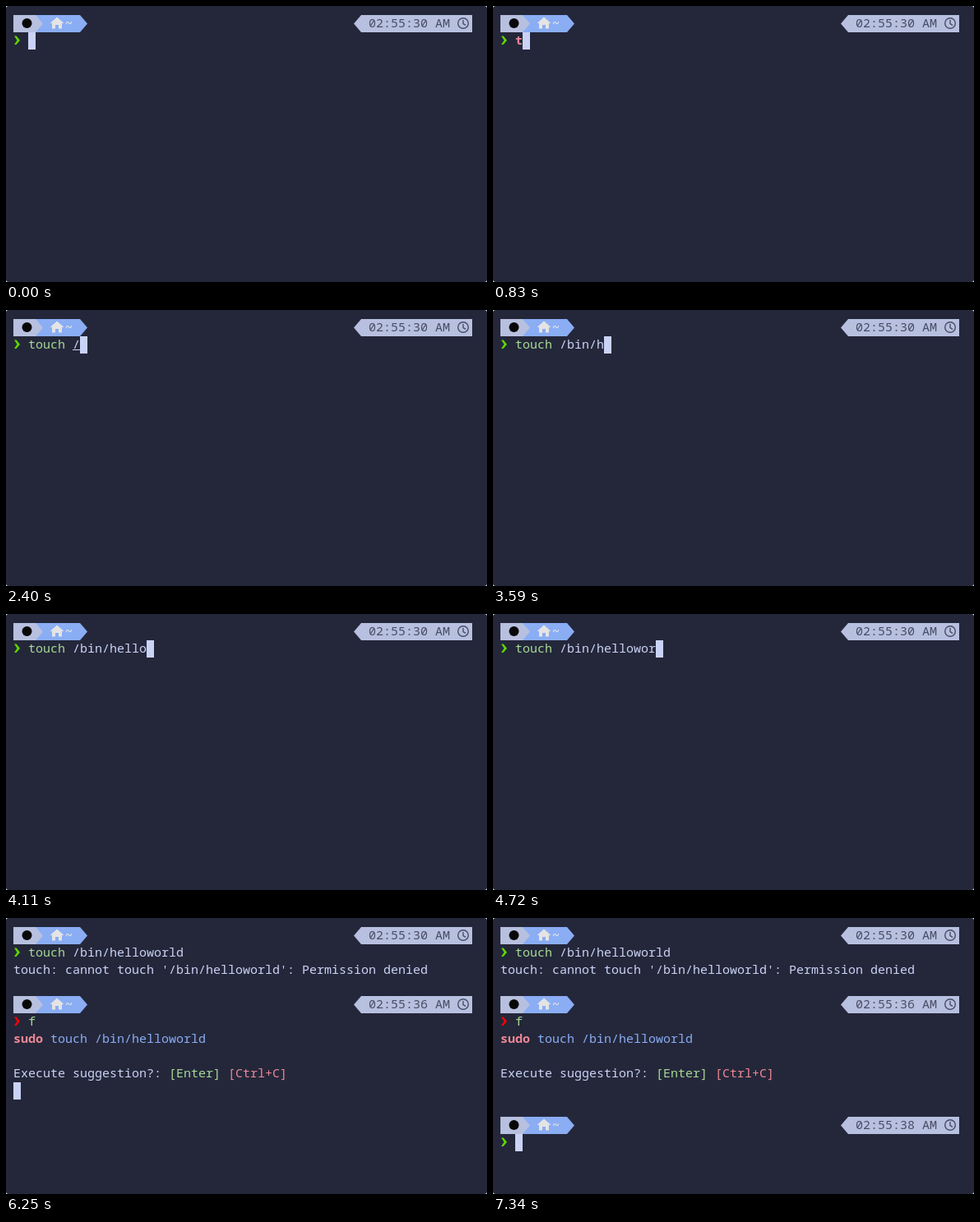
Write an HTML page that moves like this. It is 585 by 336 pixels and loops after 8000 ms.

```html
<!DOCTYPE html>
<html lang="en">
<head>
<meta charset="utf-8">
<title>Terminal</title>
<style>
  html, body { margin: 0; width: 100%; height: 100%; overflow: hidden; background: #fff; }
  svg { display: block; width: 585px; height: 336px; }
  text { font: 15px "Noto Sans Mono", "DejaVu Sans Mono", monospace; white-space: pre; }
  .bold { font-weight: 700; }
</style>
</head>
<body>
<svg id="stage" viewBox="0 0 585 336"></svg>
<script>
const LOOP = 8000, CELL = 9, LINE = 21, LEFT = 9, TOP = 11;
const color = {
  back: '#24273a', text: '#cad3f5', pale: '#b8c0e0', blue: '#8aadf4', green: '#a6da95',
  red: '#ed8796', white: '#e4e4e4', dim: '#494d64', ok: '#5fd700', fail: '#ff0000'
};

const command = 'touch /bin/helloworld';
const keyTimes = [830, 920, 1010, 1100, 1260, 1820, 2400, 2710, 2830, 2960, 3230,
  3590, 3660, 3850, 4000, 4110, 4490, 4610, 4720, 4820, 4950];
const DENIED = 5110, ALIAS = 6070, SUGGEST = 6250, DONE = 7340;

const x = col => LEFT + col * CELL;
const y = row => TOP + row * LINE;

function text(col, row, string, fill = color.text, bold = false) {
  return `<text x="${x(col)}" y="${y(row) + 15}" fill="${fill}"${bold ? ' class="bold"' : ''}>${string}</text>`;
}

function cursor(col, row) {
  return `<rect x="${x(col)}" y="${y(row)}" width="${CELL}" height="${LINE}" fill="${color.text}"/>`;
}

// Status bar on one row, prompt arrow on the next.
function prompt(row, time, arrow) {
  return `<g transform="translate(0 ${y(row)})">
    <path d="M36 0H90L99 10.5L90 21H36z" fill="${color.blue}"/>
    <path d="M9 0H36L45 10.5L36 21H9z" fill="${color.pale}"/>
    <circle cx="25.5" cy="10" r="6" fill="#080808"/>
    <path d="M62 2.5L70.5 10H68V16.5H64V12H60V16.5H56V10H53.5z" fill="${color.white}"/>
    <path d="M567 0H432L423 10.5L432 21H567z" fill="${color.pale}"/>
    <g fill="none" stroke="${color.dim}" stroke-width="1.4">
      <circle cx="556" cy="10" r="6.3"/><path d="M556 6V10.5L559 12.3"/>
    </g>
    <path d="M10 25.5H12.6L17 30.8L12.6 36H10L13.5 30.8z" fill="${arrow}"/>
  </g>` + text(7, row, '~', color.white, true) + text(48, row, time, color.dim);
}

function typedCommand(t) {
  const count = keyTimes.filter(k => t >= k).length;
  const typed = command.slice(0, count), path = typed.slice(6);
  const known = count >= 5;
  let out = text(2, 1, typed.slice(0, 5), known ? color.green : color.red, !known) + text(8, 1, path);
  // Complete existing paths are underlined while typing.
  if (['/', '/bin', '/bin/'].includes(path))
    out += `<rect x="${x(8)}" y="${y(1) + 16}" width="${path.length * CELL}" height="1" fill="${color.text}"/>`;
  return out + (t < DENIED ? cursor(2 + count, 1) : '');
}

function scene(t) {
  let out = `<rect width="585" height="336" rx="3" fill="${color.back}"/>`
    + prompt(0, '02:55:30 AM', color.ok) + typedCommand(t);
  if (t >= DENIED) {
    out += text(0, 2, `touch: cannot touch '/bin/helloworld': Permission denied`)
      + prompt(4, '02:55:36 AM', color.fail);
    if (t >= ALIAS) out += text(2, 5, 'f', color.green);
    if (t < SUGGEST) out += cursor(t < ALIAS ? 2 : 3, 5);
  }
  if (t >= SUGGEST) {
    out += text(0, 6, 'sudo', color.red, true) + text(5, 6, command, color.blue)
      + text(0, 8, 'Execute suggestion?:') + text(21, 8, '[Enter]', color.green)
      + text(29, 8, '[Ctrl+C]', color.red);
    out += t < DONE ? cursor(0, 9) : prompt(11, '02:55:38 AM', color.ok) + cursor(2, 12);
  }
  return out;
}

const stage = document.getElementById('stage');
const start = performance.now();
let shown = '';

function draw() {
  const next = scene((performance.now() - start) % LOOP);
  if (next !== shown) stage.innerHTML = shown = next;
  requestAnimationFrame(draw);
}
draw();
</script>
</body>
</html>
```
